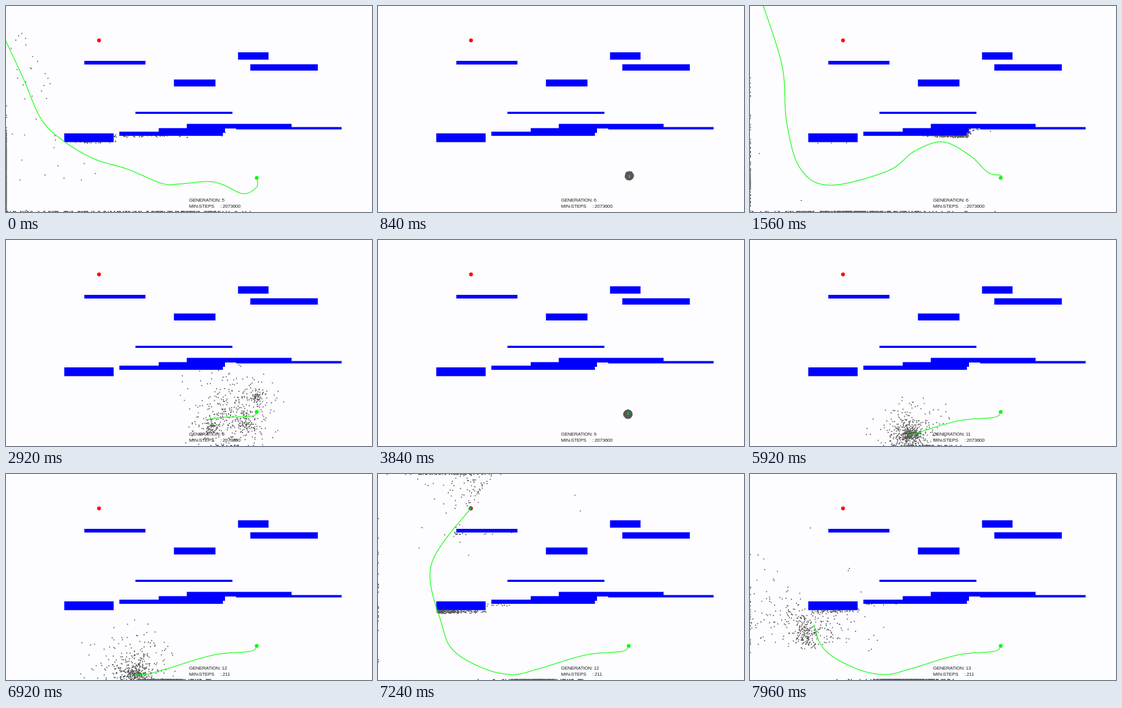
Animation, 600 px wide and 338 px high, one loop 8 s. Source, as an HTML page with a canvas:

```html
<!DOCTYPE html>
<html lang="en">
<head>
<meta charset="utf-8">
<title>Path search</title>
<style>
  html, body { margin: 0; width: 100%; height: 100%; overflow: hidden; background: #fdfcfe; }
  canvas, svg { position: absolute; left: 0; top: 0; width: 600px; height: 338px; }
  text { font: 8px "Liberation Sans", Arial, sans-serif; letter-spacing: -0.25px; fill: #222; white-space: pre; }
</style>
</head>
<body>
<canvas id="stage" width="600" height="338"></canvas>
<svg viewBox="0 0 600 338">
  <text id="gen" x="300" y="321.3"></text>
  <text id="steps" x="300" y="330.7"></text>
</svg>
<script>
const W = 600, H = 338, LOOP = 8000, TICK = 40, SUB = 4;
const START = [411, 282], GOAL = [152.5, 56.4];

// left, top, right, bottom
const BLOCKS = [
  [128.4, 90, 228.6, 96], [380.4, 76, 430.4, 88], [400.5, 95.6, 511.2, 106],
  [275.3, 120.6, 343.4, 132], [212.2, 173.6, 371.2, 177], [296.4, 193.4, 468.2, 201],
  [377.3, 198.6, 550.2, 202.5], [250.4, 200.4, 359, 208], [185.8, 206.2, 355.6, 213],
  [95.5, 209, 176.5, 223.4]
];

// Shared stretches of the leaders' ways
const WEST = ' 232,312 140,308 85,210 75,110 60,0';
const HOME = '400,291 340,297 262,320 222,329 176,320 125,291 105,248 87,150 152,56';

// Swarms: [count, spread, turn, stretch], relative to the leader's way
const WIDE = [[220, 150, -0.4, 1.4], [220, 170, -0.7, 1.4], [80, 240, -1.2, 1.2]];
const CLOSE = [[400, 20, 0, 1], [190, 44, 0.04, 1]];

// The leader passes waypoint k at age a; nothing moves after age stop
const GENS = [
  { n: 5, from: -560, a: 560, k: 12, stop: 1400, strays: 34, swarms: WIDE,
    way: '411,297 389,308 355,293 330,288 285,292 255,291 200,268 145,251 95,222 58,186 28,118 0,58' },
  { n: 6, from: 840, a: 720, k: 11, stop: 840, swarms: WIDE,
    way: '411,278 390,273 360,245 316,223 270,238 225,271 130,294 82,266 60,190 53,100 22,0' },
  { n: 7, from: 1840, a: 560, k: 4, stop: 760, swarms: WIDE,
    way: '330,296 160,318 60,180 0,10' },
  { n: 8, from: 2840, a: 80, k: 3, stop: 640, way: '403,289 355,291 328,295' + WEST,
    swarms: [[100, 12, -0.18, 0.95], [100, 12, 1.7, 0.29], [90, 14, -0.9, 0.32], [300, 44, 0.08, 0.52]] },
  { n: 9, from: 3840, a: 160, k: 3, stop: 680, way: '403,289 355,291' + WEST, swarms: CLOSE },
  { n: 10, from: 4800, a: 160, k: 5, stop: 800, way: '403,289 355,290 300,302 268,313' + WEST,
    swarms: [[90, 18, 0, 1], [90, 18, 0.08, 0.53], [200, 54, 0.08, 1.2], [230, 66, 0.22, 0.55]] },
  { n: 11, from: 5800, a: 152, k: 4, stop: 680, way: HOME, swarms: CLOSE },
  { n: 12, from: 6760, a: 152, k: 4, stop: 800, way: HOME, swarms: CLOSE },
  { n: 13, from: 7640, a: 320, k: 7, stop: 800, way: HOME,
    swarms: [[420, 32, -0.066, 1.04], [300, 85, -0.05, 1.06]] }
];

function seeded(s) {
  return () => {
    s = s + 0x6D2B79F5 | 0;
    let t = Math.imul(s ^ s >>> 15, 1 | s);
    t = t + Math.imul(t ^ t >>> 7, 61 | t) ^ t;
    return ((t ^ t >>> 14) >>> 0) / 4294967296;
  };
}

const clamp = (v, lo, hi) => Math.min(hi, Math.max(lo, v));
const inBlock = (x, y) => BLOCKS.some(([l, t, r, b]) => x > l && x < r && y > t && y < b);

// Catmull-Rom curve resampled at one point per pixel
function makeWay(text) {
  const p = [START, ...text.split(' ').map(s => s.split(',').map(Number))];
  const pts = [START], marks = [0];
  let prev = START, left = 1;
  for (let i = 0; i < p.length - 1; i++) {
    const a = p[i - 1] || p[i], b = p[i], c = p[i + 1], d = p[i + 2] || c;
    const n = Math.ceil(Math.hypot(c[0] - b[0], c[1] - b[1]) * 4);
    for (let j = 1; j <= n; j++) {
      const t = j / n;
      const q = [0, 1].map(m => 0.5 * (2 * b[m] + (c[m] - a[m]) * t +
        (2 * a[m] - 5 * b[m] + 4 * c[m] - d[m]) * t * t +
        (3 * b[m] - a[m] - 3 * c[m] + d[m]) * t * t * t));
      left -= Math.hypot(q[0] - prev[0], q[1] - prev[1]);
      if (left <= 0) { pts.push(q); left += 1; }
      prev = q;
    }
    marks.push(pts.length - 1);
  }
  const end = pts.length - 1, e = pts[end], f = pts[end - 4];
  const at = d => d <= end ? pts[Math.floor(d)]
    : [0, 1].map(m => e[m] + (e[m] - f[m]) / 4 * (d - end));
  return { pts, marks, at };
}

// Follows the leader on a way that turns and stretches about the start, drifting off
function follower(g, [, spread, turn, stretch], rnd) {
  const th = rnd() * 6.283, curl = (rnd() - 0.5) * 1.2;
  const tail = -Math.log(1 - rnd() * 0.985);
  const reach = spread * Math.pow(tail, spread > 40 ? 0.55 : 1);
  const jit = 7 * Math.sqrt(rnd()), jth = rnd() * 6.283;
  const pace = g.v * (0.95 + rnd() * 0.1);
  return age => {
    const u = age / g.a, e = u < 1 ? u * u : Math.max(0, 2 - u);
    const [px, py] = g.path.at(4 + pace * age);
    const dx = px - START[0], dy = py - START[1];
    const size = 1 + (stretch - 1) * e, c = Math.cos(turn * e) * size, s = Math.sin(turn * e) * size;
    const ang = th + curl * u, r = reach * u;
    return [
      START[0] + dx * c - dy * s + r * Math.cos(ang) + jit * Math.cos(jth),
      START[1] + dx * s + dy * c + r * Math.sin(ang) + jit * Math.sin(jth)
    ];
  };
}

// Circles about in the lower left once the swarm has passed
function stray(g, rnd) {
  const y = 40 + 270 * rnd(), x = 8 + 0.55 * y * rnd();
  const r = 30 + rnd() * 90, th = rnd() * 6.283, w = (rnd() < 0.5 ? -0.5 : 0.5) / r;
  return age => {
    const ang = th + w * Math.max(0, age - g.a);
    return [x + r * (Math.cos(ang) - Math.cos(th)), y + r * (Math.sin(ang) - Math.sin(th))];
  };
}

// Positions of one dot per tick; it dies at walls, blocks and the goal
function trace(move, ticks, stop) {
  const out = [];
  let [x, y] = move(0), dead = false;
  for (let i = 0; i < ticks; i++) {
    for (let s = SUB; i && s <= TICK && !dead; s += SUB) {
      const age = (i - 1) * TICK + s;
      if (age > stop) break;
      const [nx, ny] = move(age);
      if (inBlock(nx, ny)) { dead = true; break; }
      x = clamp(nx, 0.6, W - 0.6);
      y = clamp(ny, 0.6, H - 0.8);
      dead = x !== nx || y !== ny || Math.hypot(x - GOAL[0], y - GOAL[1]) < 3;
    }
    out.push([x, y]);
  }
  return out;
}

GENS.forEach((g, i) => {
  const rnd = seeded(g.n * 977);
  const end = i + 1 < GENS.length ? GENS[i + 1].from : LOOP;
  const ticks = Math.ceil((end - g.from) / TICK) + 1;
  g.path = makeWay(g.way);
  g.v = (g.path.marks[g.k] - 4) / g.a;
  g.dots = [];
  const add = move => g.dots.push(trace(move, ticks, g.stop));
  for (const s of g.swarms)
    for (let j = 0; j < s[0]; j++) add(follower(g, s, rnd));
  for (let j = 0; j < (g.strays || 0); j++) add(stray(g, rnd));
});

const ctx = document.getElementById('stage').getContext('2d');
const genText = document.getElementById('gen');
const stepText = document.getElementById('steps');

function disc([x, y], r, color) {
  ctx.fillStyle = color;
  ctx.beginPath();
  ctx.arc(x, y, r, 0, 7);
  ctx.fill();
}

function draw(t) {
  const g = GENS.filter(q => q.from <= t).pop();
  const tick = Math.floor((t - g.from) / TICK);
  const age = Math.min(tick * TICK, g.stop);

  ctx.fillStyle = '#fdfcfe';
  ctx.fillRect(0, 0, W, H);
  ctx.fillStyle = '#00f';
  for (const [l, top, r, b] of BLOCKS) ctx.fillRect(l, top, r - l, b - top);
  disc(GOAL, 3.1, '#f00');
  disc(START, 3.1, '#0f0');

  ctx.fillStyle = '#585858';
  ctx.beginPath();
  for (const d of g.dots) {
    const [x, y] = d[tick];
    ctx.moveTo(x + 0.95, y);
    ctx.arc(x, y, 0.95, 0, 6.284);
  }
  ctx.fill();

  const line = g.path.pts.slice(0, Math.round(5 + g.v * age));
  ctx.strokeStyle = '#0f0';
  ctx.lineWidth = 1.1;
  ctx.beginPath();
  for (const p of line) ctx.lineTo(...p);
  ctx.stroke();
  disc(line[line.length - 1], 1, '#0f0');

  genText.textContent = 'GENERATION: ' + g.n;
  stepText.textContent = 'MIN-STEPS     : ' + (g.n < 12 ? 2073600 : 211);
}

const t0 = performance.now();
let last = -1;
function loop() {
  const t = Math.floor((performance.now() - t0) % LOOP / TICK) * TICK;
  if (t !== last) draw(last = t);
  requestAnimationFrame(loop);
}
loop();
</script>
</body>
</html>
```
